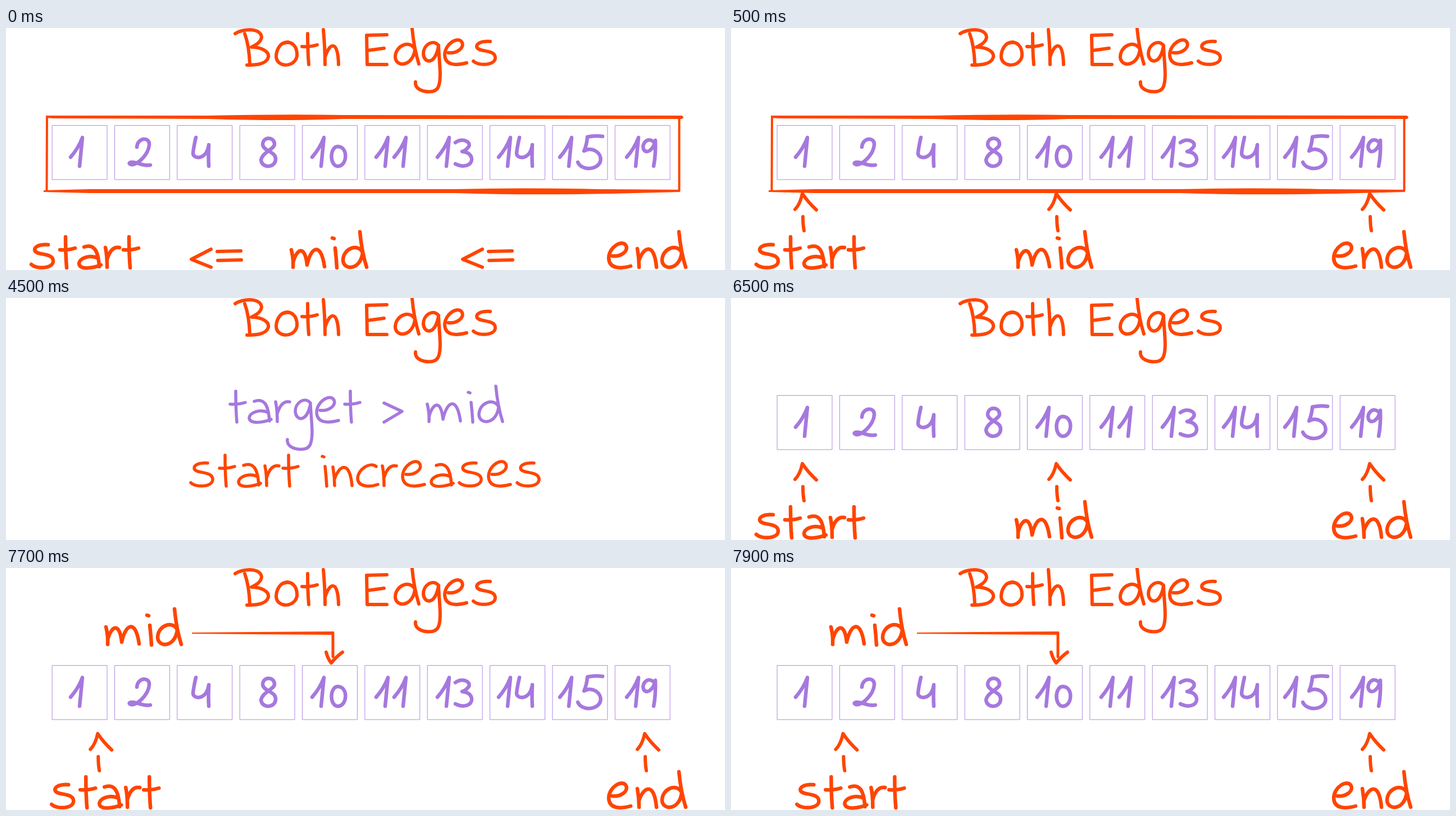
These frames come from a looping animation (1280x431 px, 8 s). An HTML page:

```html
<!DOCTYPE html>
<html lang="en">
<head>
<meta charset="utf-8">
<title>Both Edges</title>
<style>
  html, body { margin: 0; width: 100%; height: 100%; overflow: hidden; background: #fff; }
  svg { display: block; width: 100%; height: 100%; }
</style>
</head>
<body>
<svg id="stage" viewBox="0 0 1280 431" fill="none" stroke-linecap="round" stroke-linejoin="round"></svg>
<script>
const LOOP = 8000;
const ORANGE = '#ff4500';
const PURPLE = '#a678de';
const stage = document.getElementById('stage');

// Handwritten letters: [advance, pen path on a baseline at y = 0]
const glyphs = {
  ' ': [36, ''],
  a: [48, 'M12-40C29-46 37-35 39-5M37-20C22-27 3-20 3-10C5 2 30-3 42-8'],
  c: [44, 'M36-38C24-47 3-32 3-16C4-1 26-1 39-6'],
  d: [50, 'M33-67C35-45 40-20 45-4M38-30C30-47 3-38 3-16C4 2 34 2 38-30'],
  e: [51, 'M9-24C24-22 38-32 34-42C28-55 3-40 3-20C4 1 28-2 42-6'],
  g: [38, 'M30-37C20-49 3-38 3-22C4-5 24-1 30-36C31-8 36 20 30 36C25 50 2 46-6 40Q-12 35-11 28'],
  h: [41, 'M4-65Q7-30 7-3M7-16C14-40 30-50 31-3'],
  i: [19, 'M3-56l3 1M8-38Q10-20 11-3'],
  m: [72, 'M2-35Q6-18 5-4M5-12C11-36 26-46 30-8C36-38 54-52 61-5'],
  n: [44, 'M3-37Q6-20 6-4M6-16C15-42 33-48 37-4'],
  o: [46, 'M24-43C8-43 3-26 3-17C4 3 36 3 40-18C41-36 30-46 17-41'],
  r: [32, 'M3-39Q6-25 6-4M6-18Q13-42 28-39'],
  s: [52, 'M33-44C16-45 9-40 9-35C10-24 42-31 42-15C42-1 12 0 3-9'],
  t: [34, 'M13-58Q13-25 15-3M3-35Q18-34 30-38'],
  B: [73, 'M3-58C16-67 48-69 50-52C49-42 38-37 32-34C50-34 64-26 62-16C58-2 36-2 24-2M20-58Q28-36 29-3'],
  E: [52, 'M40-56L4-55L5-3L40-3M6-28L35-32'],
  '>': [42, 'M3-37L35-22L3-3'],
  '<': [47, 'M40-36L5-18L40-4'],
  '=': [50, 'M4-32L46-33M5-16L47-17'],
  0: [36, 'M18-39C4-39 2-8 16-4C34-1 38-38 18-39'],
  1: [32, 'M4-20Q18-36 25-55Q22-25 20-4'],
  2: [44, 'M17-38C18-55 40-57 39-42C38-28 26-14 14-8C4-4 0-11 8-11C20-11 28-3 41-6'],
  3: [36, 'M4-46C16-55 32-48 28-39Q22-31 16-30C36-28 36-12 28-7Q18-1 4-8'],
  4: [37, 'M9-55Q5-38 4-27C4-16 28-14 32-42Q31-20 32-4'],
  5: [52, 'M48-57Q34-59 21-56Q20-42 15-31C28-40 48-28 44-12C38 4 10 4 4-11'],
  8: [34, 'M27-44C26-57 6-57 6-42C8-30 30-30 29-16C28 0 4 0 3-15C6-30 28-34 27-44'],
  9: [30, 'M25-46C14-58 2-44 6-34C12-24 24-34 27-50Q28-24 24-4']
};
const kerning = { re: 4, rg: 3, ar: -1, as: 2, th: 3, st: -1, et: -1, 19: -4 };

function add(parent, tag, attrs) {
  const node = document.createElementNS('http://www.w3.org/2000/svg', tag);
  for (const key in attrs) node.setAttribute(key, attrs[key]);
  return parent.appendChild(node);
}

const group = (parent = stage) => add(parent, 'g', {});

function write(parent, text, x, y, color = ORANGE, width = 6.5) {
  const word = add(parent, 'g', { role: 'img', 'aria-label': text, stroke: color, 'stroke-width': width });
  [...text].forEach((ch, i) => {
    const [advance, d] = glyphs[ch];
    if (d) add(word, 'path', { d, transform: `translate(${x} ${y})` });
    x += advance + (kerning[ch + text[i + 1]] || 0);
  });
}

const line = (parent, d, width = 6) => add(parent, 'path', { d, stroke: ORANGE, 'stroke-width': width });
const brush = (parent, d) => add(parent, 'path', { d, fill: ORANGE });

function arrow(parent, x) {
  line(parent, `M${x - 14} 323Q${x - 5} 314 ${x - 1} 295Q${x + 9} 310 ${x + 24} 324M${x} 336Q${x} 350 ${x + 2} 361`);
}

write(stage, 'Both Edges', 405, 68, ORANGE, 6);

const cells = group();
const numbers = [1, 2, 4, 8, 10, 11, 13, 14, 15, 19];
const digitX = [111, 216, 329, 451, 541, 655, 764, 873, 982, 1101];
numbers.forEach((n, i) => {
  add(cells, 'rect', {
    x: 82.5 + 111.35 * i, y: 173.5, width: 97.5, height: 96.5,
    stroke: '#b08ae3', 'stroke-width': 1
  });
  write(cells, String(n), digitX[i], 250, PURPLE);
});

const frame = group();
brush(frame, 'M71 156L85 156L360 156Q500 153 600 155L1203 156Q1209 159 1203 162L600 162Q500 166 360 162L85 161L71 160Z');
brush(frame, 'M67 289L150 287L800 287Q920 284 1050 287L1200 288L1200 292L1080 295Q920 298 800 294L150 294L67 292Z');
line(frame, 'M73 158L72.5 290M1198.5 160L1198.5 289', 4);

const start = group();
const startArrow = group(start);
write(start, 'start', 42, 430);
arrow(startArrow, 128);

const mid = group();
const midArrow = group(mid);
write(mid, 'mid', 506, 430);
arrow(midArrow, 580);

const end = group();
const endArrow = group(end);
write(end, 'end', 1070, 430);
arrow(endArrow, 1138);

const order = group();
write(order, '<=', 325, 430, ORANGE, 6);
write(order, '<=', 808, 430, ORANGE, 6);

const condition = group();
write(condition, 'target > mid', 396, 224, PURPLE, 5.5);
const result = group();
write(result, 'start increases', 326, 338, ORANGE, 5.5);

const midAbove = group();
write(midAbove, 'mid', 176, 140);
brush(midAbove, 'M331 115L440 114L584 113L584 119L440 118L331 117Z');
line(midAbove, 'M582 116L582 158', 5);
line(midAbove, 'M570 150Q573 162 579 169Q589 157 599 150');

const show = (node, on) => node.setAttribute('display', on ? 'inline' : 'none');

function draw(t) {
  const array = t < 2500 || t >= 6500;
  const arrows = t >= 500;
  const raised = t >= 7500;
  [cells, start, end].forEach(node => show(node, array));
  [startArrow, midArrow, endArrow].forEach(node => show(node, arrows));
  show(frame, t < 2500);
  show(order, !arrows);
  show(mid, array && !raised);
  show(midAbove, raised);
  show(condition, !array);
  show(result, !array && t >= 4500);
  const step = Math.max(0, Math.floor((t - 7500) / 100));
  start.setAttribute('transform', `translate(${18.1 * step} 0)`);
}

const origin = performance.now();
function tick() {
  draw((performance.now() - origin) % LOOP);
  requestAnimationFrame(tick);
}
tick();
</script>
</body>
</html>
```
